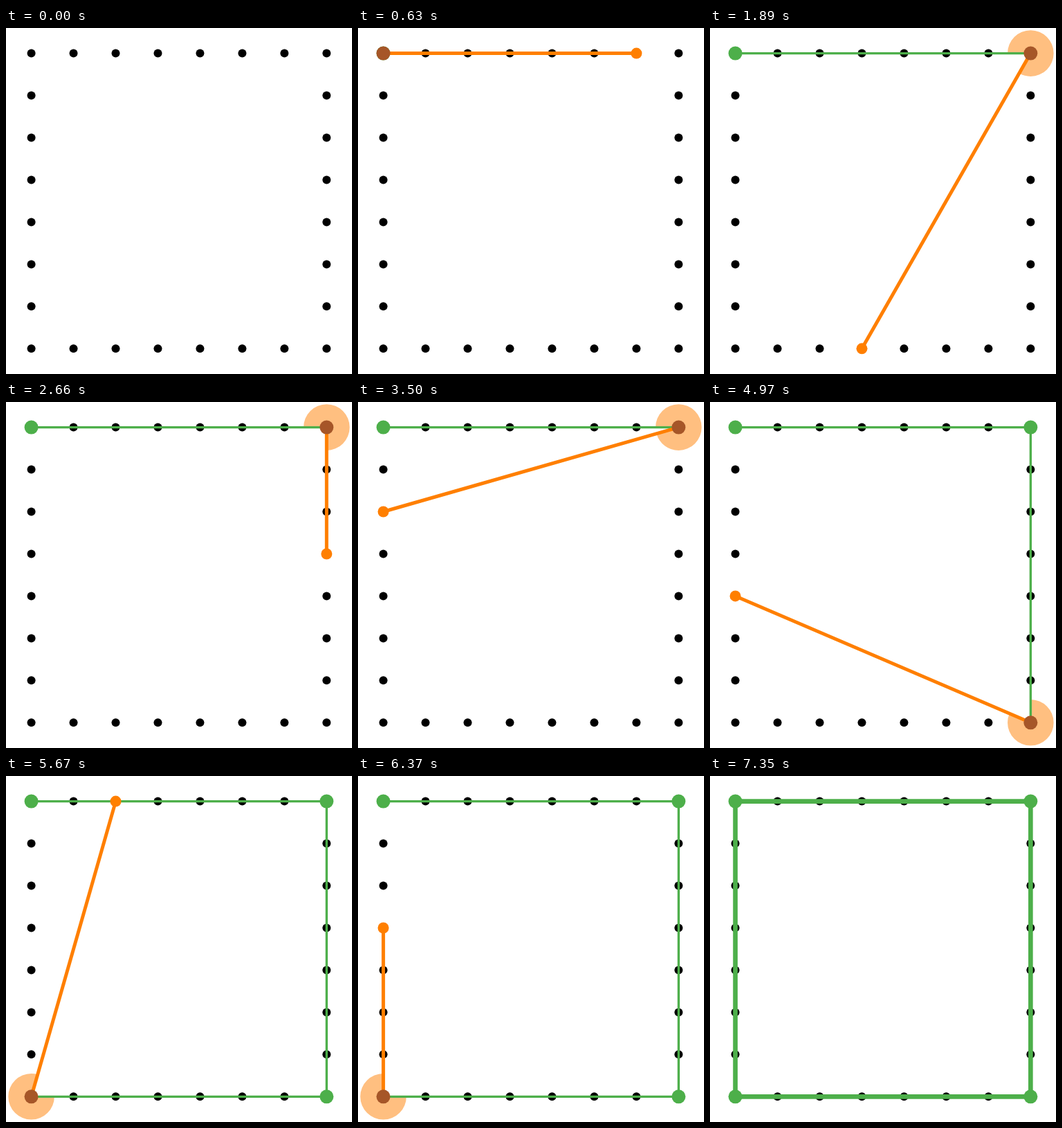
An HTML page with a canvas for the animation above (8 s loop, 500 by 500 pixels).

```html
<!DOCTYPE html>
<html lang="en">
<head>
<meta charset="utf-8">
<title>Gift wrapping</title>
<style>
html, body { margin: 0; width: 100%; height: 100%; overflow: hidden; background: #fff; }
canvas { display: block; width: 500px; height: 500px; }
</style>
</head>
<body>
<canvas id="stage" width="500" height="500"></canvas>
<script>
const ctx = document.getElementById('stage').getContext('2d');
const GREEN = '#4daf4a', ORANGE = '#ff7f00', BROWN = '#a65628';
const STEP = 70, LOOP = 8000, ROUND = 26, DONE = 4 * ROUND + 1;

// Points are numbered clockwise around the square; corners are 0, 7, 14, 21.
const ORDER = [18, 9, 2, 23, 16, 12, 4, 20, 6, 27, 1, 10, 25, 15,
               5, 22, 3, 13, 24, 17, 8, 19, 11, 26, 14, 21, 7, 0];

function cell(n) {
  n = (n + 28) % 28;
  const k = n % 7;
  return [[k, 0], [7, k], [7 - k, 7], [0, 7 - k]][Math.floor(n / 7)];
}
const place = n => cell(n).map(v => 36.6 + v * 60.96);

function dot(n, r, color) {
  ctx.fillStyle = color;
  ctx.beginPath();
  ctx.arc(...place(n), r, 0, 2 * Math.PI);
  ctx.fill();
}

function line(a, b, width, color) {
  ctx.strokeStyle = color;
  ctx.lineWidth = width;
  ctx.beginPath();
  ctx.moveTo(...place(a));
  ctx.lineTo(...place(b));
  ctx.stroke();
}

function heading(from, to) {
  const [x, y] = cell(from), [u, v] = cell(to);
  return Math.atan2(v - y, u - x);
}

function sector(pivot, prev, next) {
  const start = heading(pivot, prev), end = heading(pivot, next);
  if (start === end) return;
  const [x, y] = place(pivot);
  ctx.fillStyle = '#ffbf80';
  ctx.beginPath();
  ctx.moveTo(x, y);
  ctx.arc(x, y, 33.3, start, end);
  ctx.fill();
}

function draw(step) {
  ctx.fillStyle = '#fff';
  ctx.fillRect(0, 0, 500, 500);
  for (let n = 0; n < 28; n++) dot(n, 6, '#000');
  if (step === 0) return;

  const done = step >= DONE;
  const edges = done ? 4 : Math.floor((step - 1) / ROUND);
  const pivot = 7 * edges, prev = pivot - 7;
  const open = ORDER.filter(n => n !== pivot && n !== (prev + 28) % 28);
  const next = open[(step - 1) % ROUND];

  if (!done && edges) sector(pivot, prev, next);
  for (let k = 0; k < edges; k++) line(7 * k, 7 * k + 7, done ? 6.67 : 3.33, GREEN);
  for (let k = 0; k < Math.max(edges, 1); k++) dot(7 * k, 10, GREEN);
  if (done) return;

  line(pivot, next, 5, ORANGE);
  dot(next, 8, ORANGE);
  dot(pivot, 10, BROWN);
}

function frame() {
  draw(Math.min(DONE, Math.floor(performance.now() % LOOP / STEP)));
  requestAnimationFrame(frame);
}
frame();
</script>
</body>
</html>
```
